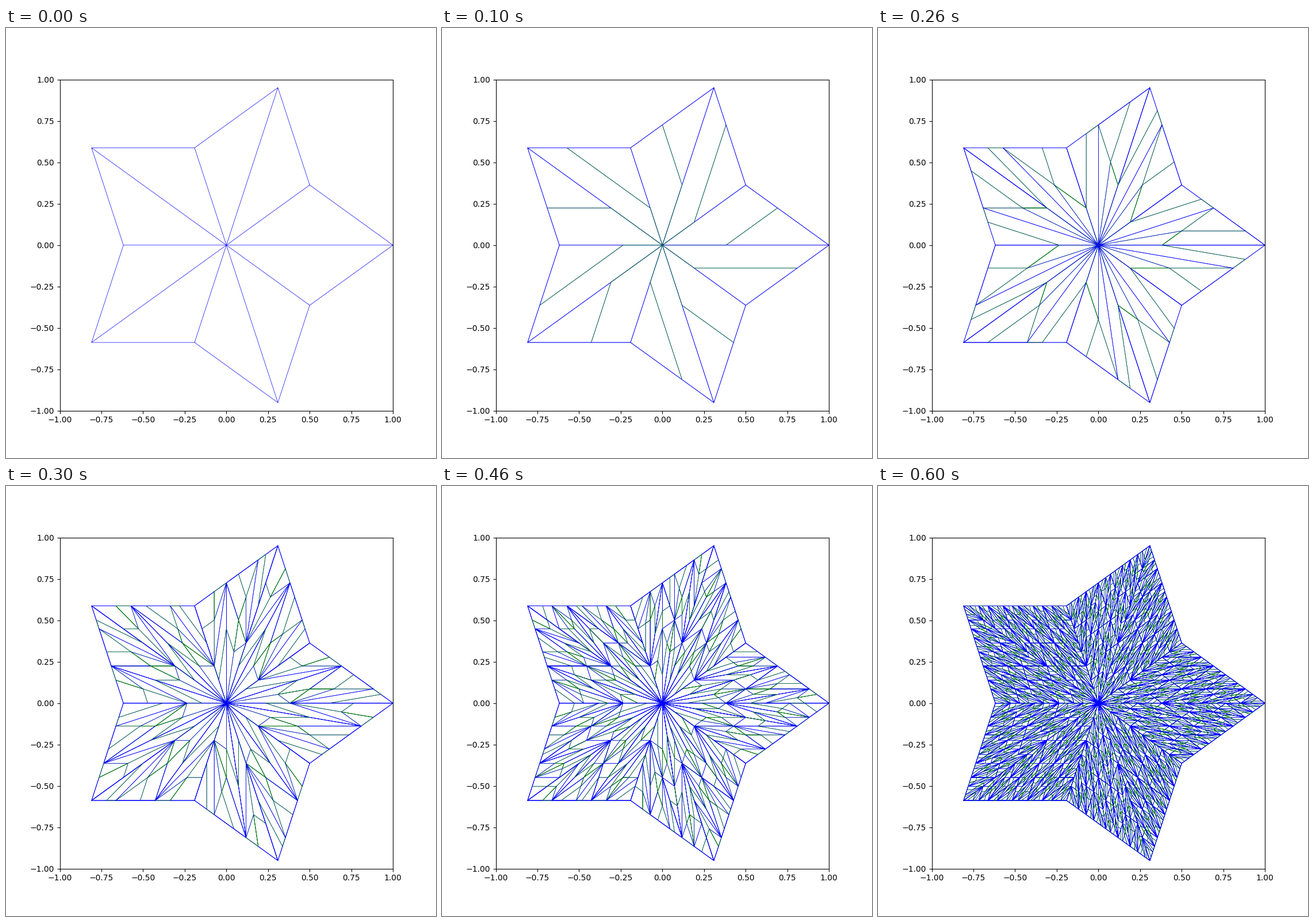
A matplotlib script for the animation above (0.7 s loop, 748 by 748 pixels).

```python
import math

import matplotlib.pyplot as plt
from matplotlib.animation import FuncAnimation
from matplotlib.collections import LineCollection

PHI = (1 + math.sqrt(5)) / 2
STEPS = 7
GREEN, BLUE = 0, 1
COLORS = {GREEN: (0, 0.5, 0), BLUE: (0, 0, 1)}


def star_point(i):
    """Corner i of a five-pointed star: tips at radius 1, notches at 1/PHI."""
    radius = 1 / PHI if i % 2 else 1
    angle = i * math.pi / 5
    return radius * complex(math.cos(angle), math.sin(angle))


def subdivide(triangles):
    result = []
    for kind, a, b, c in triangles:
        if kind == GREEN:
            p = a + (b - a) / PHI
            result += [(GREEN, c, p, b), (BLUE, p, c, a)]
        else:
            q = b + (a - b) / PHI
            r = b + (c - b) / PHI
            result += [(BLUE, r, c, a), (BLUE, q, r, b), (GREEN, r, q, a)]
    return result


def outline(triangles):
    """Two open sides of each triangle, drawn in order."""
    return LineCollection(
        [[(z.real, z.imag) for z in corners] for _, *corners in triangles],
        colors=[COLORS[kind] for kind, *_ in triangles],
        linewidths=0.5, capstyle="projecting", joinstyle="round", zorder=2)


fig, ax = plt.subplots(figsize=(7.48, 7.48), dpi=100)
ax.set_xlim(-1, 1)
ax.set_ylim(-1, 1)

layers = []
triangles = [(BLUE, 0j, star_point(i), star_point(i + 1)) for i in range(10)]
for _ in range(STEPS):
    layers.append(ax.add_collection(outline(triangles), autolim=False))
    triangles = subdivide(triangles)


def update(step):
    # Every generation stays on top of the earlier ones.
    for k, layer in enumerate(layers):
        layer.set_visible(k <= step)
    return layers


anim = FuncAnimation(fig, update, frames=STEPS, interval=100, repeat=True)
plt.show()
```
